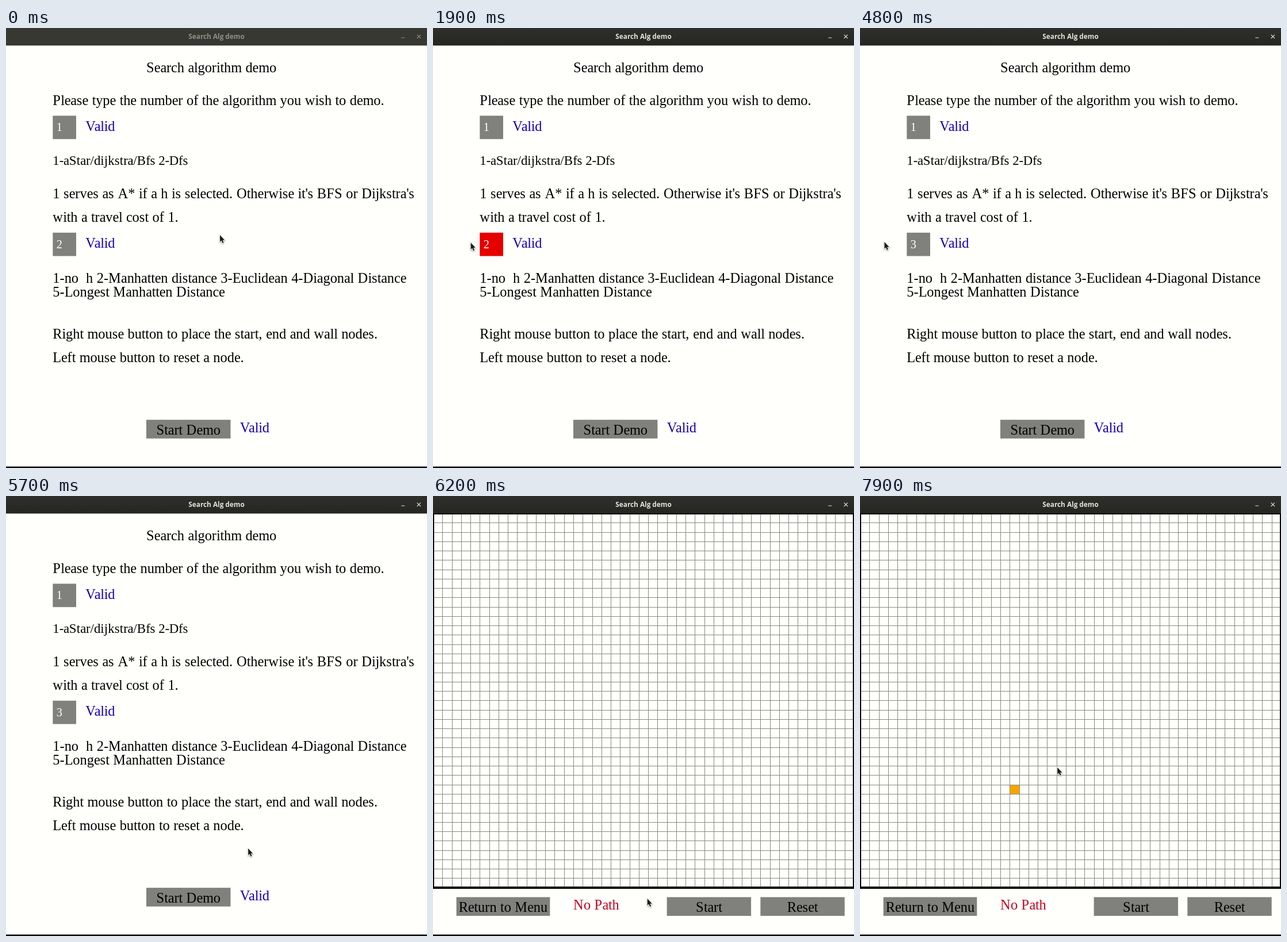
Write an HTML page that moves like this. It is 732 px wide and 765 px high and loops after 8000 ms.

```html
<!DOCTYPE html>
<html lang="en">
<head>
<meta charset="utf-8">
<title>Search Alg demo</title>
<style>
  html, body { margin: 0; width: 100%; height: 100%; overflow: hidden; background: #fffffb; }
  svg { display: block; }
  .page { font-family: "Liberation Serif", "Times New Roman", serif; font-variant-ligatures: none; }
  .page text { white-space: pre; }
  .bar text { font: bold 11.8px "Open Sans", "Noto Sans", sans-serif; text-anchor: middle; }
  .cursor { filter: drop-shadow(.6px 1px .8px rgba(0, 0, 0, .4)); }
</style>
</head>
<body>
<svg width="732" height="765" viewBox="0 0 732 765">
  <defs>
    <linearGradient id="active" x2="0" y2="1">
      <stop offset="0" stop-color="#2f302b"/><stop offset="1" stop-color="#252622"/>
    </linearGradient>
  </defs>
  <rect width="732" height="765" fill="#fffffb"/>
  <g id="menu" class="page" transform="translate(0 30.5) scale(.81333)"></g>
  <g id="board">
    <rect id="cell" x="260" y="502" width="17" height="17" fill="#f5a500"/>
    <path id="grid" stroke="#8a8a83" fill="none"/>
    <rect x="0" y="30" width="732" height="651" fill="none" stroke="#000" stroke-width="4"/>
    <g id="controls" class="page" transform="translate(0 30.5) scale(.81333)"></g>
  </g>
  <rect y="762.5" width="732" height="2.5" fill="#000"/>
  <g class="bar">
    <rect id="barFill" width="732" height="30.5"/>
    <g id="barInk">
      <text x="366" y="19.3">Search Alg demo</text>
      <path d="M687.3 17H693.3M714.7 11.7L721 18M721 11.7L714.7 18" stroke="currentColor" stroke-width="1.1"/>
    </g>
  </g>
  <path id="cursor" class="cursor" d="M0 0V11.8L2.6 9.4 4.4 14 6.5 13.1 4.7 8.7H8.2Z"
    fill="#1c1c1c" stroke="#fff" stroke-width="1.8" paint-order="stroke"/>
</svg>
<script>
const $ = id => document.getElementById(id);
const GRAY = "#80807c", RED = "#e60000", BLUE = "#1400b4";
const PERIOD = 8000, TICK = 100;
const ctx = document.createElement("canvas").getContext("2d");
ctx.font = '300px "Liberation Serif", "Times New Roman", serif';
const width = str => ctx.measureText(str).width / 300;

function add(parent, tag, attrs) {
  const el = document.createElementNS("http://www.w3.org/2000/svg", tag);
  for (const key in attrs) el.setAttribute(key, attrs[key]);
  return parent.appendChild(el);
}

// Glyph places, with advances and kerning in whole units; the last one is the total width.
function advances(str, size) {
  const xs = [0];
  [...str].forEach((ch, i) => {
    const next = str[i + 1] || "";
    const kern = width(ch + next) - width(ch) - width(next);
    xs.push(xs[i] + Math.round(width(ch) * size) + Math.round(kern * size));
  });
  return xs;
}

function write(parent, str, x, top, fill = "#000", size = 30) {
  const xs = advances(str, size).slice(0, -1).map(dx => x + dx);
  const y = top + Math.round(size * .891);
  const el = add(parent, "text", { x: xs.join(" "), y, fill, "font-size": size });
  el.textContent = str;
  return el;
}

const box = (parent, x, y, width, height) =>
  add(parent, "rect", { x, y, width, height, fill: GRAY });

function addButton(parent, x, y, w, label) {
  const rect = box(parent, x, y, w, 40);
  write(parent, label, x + (w - advances(label, 30).at(-1)) / 2, y + 5);
  return rect;
}

function addField(y, value) {
  const rect = box(menu, 100, y, 50, 50);
  write(menu, "Valid", 170, y + 5, BLUE);
  return { rect, digit: write(menu, value, 108, y + 11, "#fff", 25) };
}

const menu = $("menu"), controls = $("controls");
addField(150, "1");
const field = addField(400, "2");
write(menu, "Search algorithm demo", 300, 30);
write(menu, "1-aStar/dijkstra/Bfs 2-Dfs", 100, 230, "#000", 28);
Object.entries({
  100: "Please type the number of the algorithm you wish to demo.",
  300: "1 serves as A* if a h is selected. Otherwise it's BFS or Dijkstra's",
  350: "with a travel cost of 1.",
  480: "1-no  h 2-Manhatten distance 3-Euclidean 4-Diagonal Distance",
  510: "5-Longest Manhatten Distance",
  600: "Right mouse button to place the start, end and wall nodes.",
  650: "Left mouse button to reset a node."
}).forEach(([top, line]) => write(menu, line, 100, +top));
const button = addButton(menu, 300, 800, 180, "Start Demo");
write(menu, "Valid", 500, 800, BLUE);

addButton(controls, 50, 820, 200, "Return to Menu");
addButton(controls, 500, 820, 180, "Start");
addButton(controls, 700, 820, 180, "Reset");
write(controls, "No Path", 300, 820, "#c8001e");

const pitch = 732 / 45;
let lines = "";
for (let i = 1; i < 45; i++) lines += `M${Math.round(i * pitch) + .5} 31V680`;
for (let i = 1; i < 40; i++) lines += `M1 ${Math.round(30 + i * pitch) + .5}H731`;
$("grid").setAttribute("d", lines);

// Pointer moves: when they start and end, where they lead, and how the path bends.
const home = [372, 360];
const moves = [
  { from: 400, till: 500, to: [302, 360] },
  { from: 600, till: 900, to: [121, 371] },
  { from: 1000, till: 1200, to: [112, 376] },
  { from: 1700, till: 2000, to: [42.5, 372] },
  { from: 5200, till: 5900, to: [372.7, 700], bend: [[200, 245], [570, 700]] },
  { from: 6200, till: 6600, to: [335, 625] },
  { from: 6700, till: 6800, to: [286, 549] },
  { from: 7000, till: 7300, to: [263, 511] },
  { from: 7800, till: 7900, to: [343.3, 472] }
];

const mix = (a, b, u) => a.map((v, i) => v + (b[i] - v) * u);

// Point on a Bezier curve of any degree.
function curve(points, u) {
  while (points.length > 1) points = points.slice(1).map((p, i) => mix(points[i], p, u));
  return points[0];
}

function pointer(t) {
  let at = home;
  for (const { from, till, to, bend = [] } of moves) {
    if (t <= from) break;
    at = curve([at, ...bend, to], Math.min(1, (t - from) / (till - from)));
  }
  return at;
}

const show = (el, on) => el.setAttribute("visibility", on ? "visible" : "hidden");

function draw(t) {
  const within = (from, till) => t >= from && t < till;
  const focused = t >= 1400, playing = t >= 6200;
  const ink = focused ? "#e6e3db" : "#908e86";

  $("cursor").setAttribute("transform", `translate(${pointer(t)})`);
  $("barFill").setAttribute("fill", focused ? "url(#active)" : "#383833");
  $("barInk").setAttribute("fill", ink);
  $("barInk").setAttribute("color", ink);

  field.rect.setAttribute("fill", within(1500, 4800) ? RED : GRAY);
  field.digit.textContent = t < 3200 ? "2" : t < 3300 ? "" : "3";
  button.setAttribute("fill", within(6100, 6200) ? RED : GRAY);

  show(menu, !playing);
  show($("board"), playing);
  show($("cell"), t >= 7700);
}

const start = performance.now();
function tick() {
  const t = (performance.now() - start) % PERIOD;
  draw(Math.floor(t / TICK) * TICK);
  requestAnimationFrame(tick);
}
tick();
</script>
</body>
</html>
```
